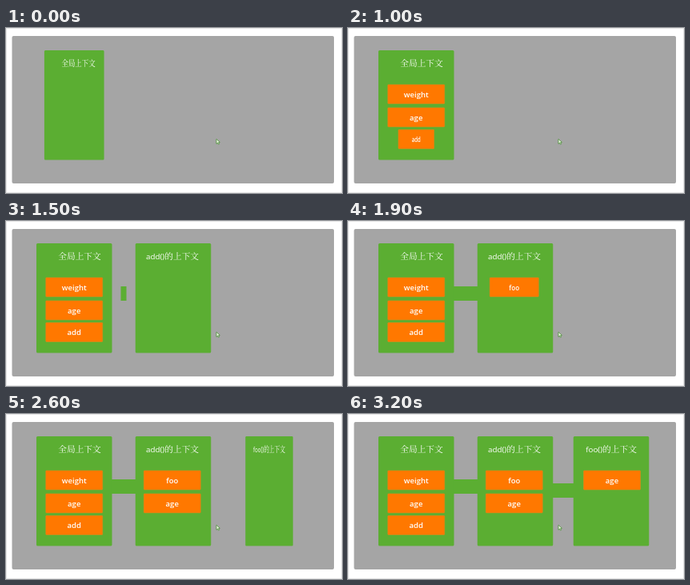
An HTML page for the animation above (3.3 s loop, 420 by 207 pixels).

```html
<!DOCTYPE html>
<html lang="zh">
<head>
<meta charset="utf-8">
<style>
html, body { margin: 0; width: 100%; height: 100%; overflow: hidden; background: #fff; }
svg { display: block; }
text { fill: #fff; text-anchor: middle; }
.label { font: 600 9.5px "Open Sans", "Noto Sans", sans-serif; }
.title { font: 300 10.7px "Noto Serif CJK SC", "Noto Sans CJK SC", "Noto Sans CJK", sans-serif; }
.title tspan { font: 500 9.8px "Open Sans", "Noto Sans", sans-serif; }
.panel { fill: #5bae32; }
.box { fill: #ff7800; stroke: #d98a1c; stroke-width: .6; }
</style>
</head>
<body>
<svg id="stage" width="420" height="207" viewBox="0 0 420 207">
  <rect x=".5" y=".5" width="419" height="206" fill="#fff" stroke="#e6e6e6"/>
  <rect x="7.5" y="10" width="402.5" height="185" rx="2" fill="#a5a5a5"/>
  <g id="parts"></g>
  <path d="M263 139.3v6l1.5-1.3 1 2 1-.5-.9-1.9 1.8-.3z" fill="#e6f2dd" stroke="#3f8a2a" stroke-width=".7"/>
</svg>
<script>
const LOOP = 3300, STEP = 100, GROW = 310;
const parts = document.getElementById('parts');
const items = [];

// Each part widens from its own vertical centre line, beginning at `start`.
function add(start, cx, markup) {
  const g = document.createElementNS('http://www.w3.org/2000/svg', 'g');
  g.innerHTML = markup;
  parts.append(g);
  items.push({ g, start, cx });
}

const rect = (cls, cx, y, w, h, r) =>
  `<rect class="${cls}" x="${cx - w / 2}" y="${y}" width="${w}" height="${h}" rx="${r}"/>`;

const panel = (start, cx, titleX, title) =>
  add(start, cx, rect('panel', cx, 28, 94.5, 137.5, 1.5) +
    `<text class="title" x="${titleX}" y="48">${title}</text>`);

const link = (start, cx, y, w) => add(start, cx, rect('panel', cx, y, w, 18, 0));

const box = (start, cx, y, name) =>
  add(start, cx, rect('box', cx, y, 71, 24, .8) +
    `<text class="label" x="${cx}" y="${y + 15.6}">${name}</text>`);

panel(-245, 85.25, 92, '全局上下文');
box(150, 85.25, 71, 'weight');
box(510, 85.25, 100, 'age');
box(805, 85.25, 127.5, 'add');
panel(1152, 209, 208, '<tspan>add()</tspan>的上下文');
link(1430, 147, 82, 31);
box(1633, 207.75, 71, 'foo');
box(2030, 207.75, 100, 'age');
panel(2405, 329, 329, '<tspan>foo()</tspan>的上下文');
link(2690, 269, 87, 27);
box(2890, 330, 71, 'age');

function draw(now) {
  const t = Math.floor(now % LOOP / STEP) * STEP;
  for (const { g, start, cx } of items) {
    const s = Math.min(1, (t - start) / GROW);
    g.style.display = s > 0 ? '' : 'none';
    if (s > 0) g.setAttribute('transform', `translate(${cx * (1 - s)}) scale(${s} 1)`);
  }
}

const begin = performance.now();
function tick() {
  draw(performance.now() - begin);
  requestAnimationFrame(tick);
}
tick();
</script>
</body>
</html>
```
